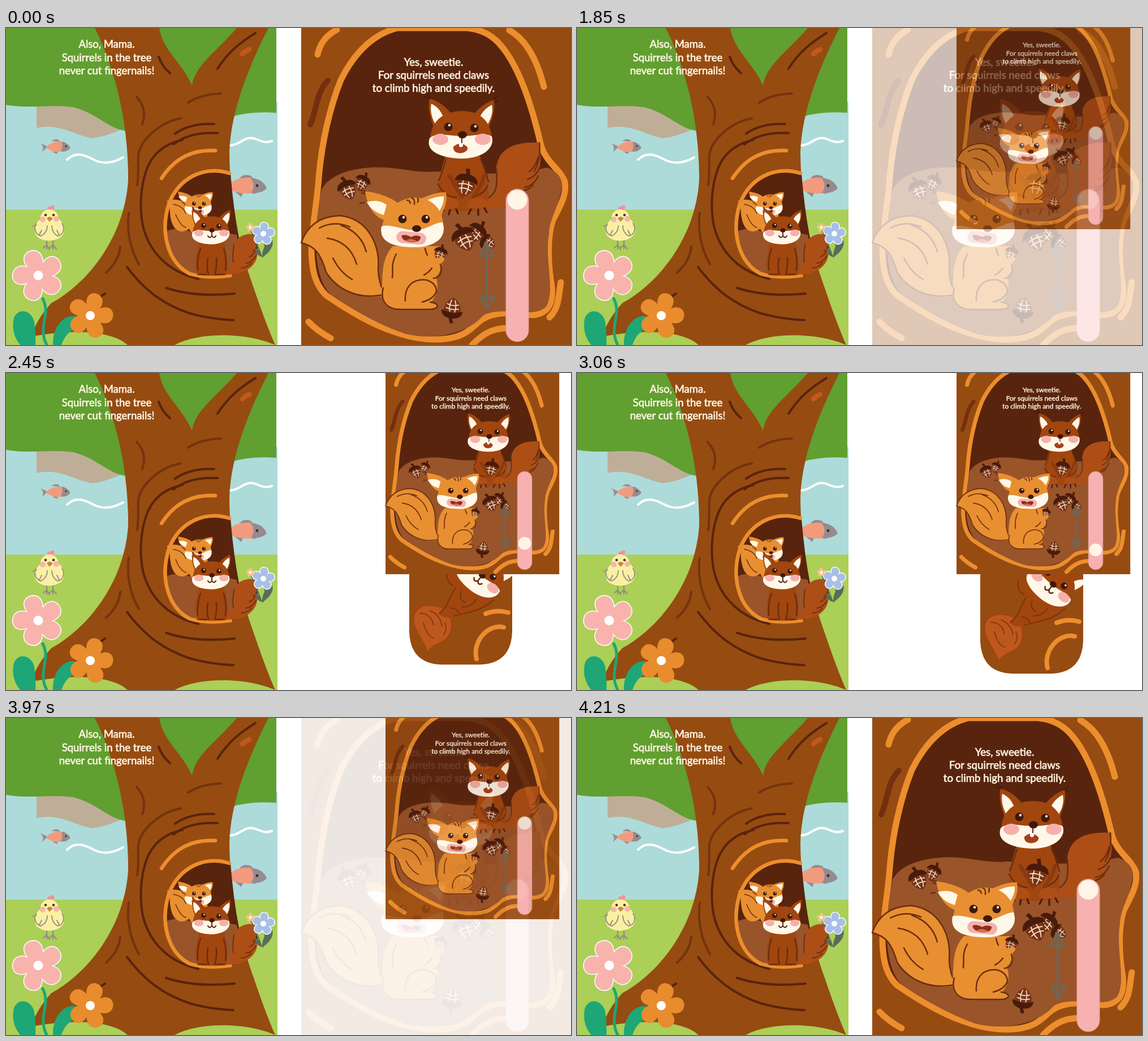
Recreate the animation shown at these times as an HTML page. Size 999 px wide and 561 px high, loop 4810 ms.

```html
<!DOCTYPE html>
<html lang="en">
<head>
<meta charset="utf-8">
<title>Squirrels in the tree</title>
<style>
html, body { margin: 0; width: 100%; height: 100%; overflow: hidden; background: #fff; }
svg { display: block; width: 100%; height: 100%; }
text { font-family: Lato, "Open Sans", sans-serif; fill: #fff6e4; stroke: #fff6e4; stroke-width: .65px; text-anchor: middle; }
.l { fill: none; stroke-linecap: round; stroke-linejoin: round; }
.dk { stroke: #59240d; stroke-width: 4; }
.md { stroke: #733310; stroke-width: 4; }
.or { stroke: #ec8e2d; stroke-width: 11; }
.thin { stroke: #6b2e0c; stroke-width: 2.5; }
.pup { fill: #e88f32; }
.mama { fill: #a1460f; }
.tail { fill: #ad4e17; }
.cream { fill: #fff8e9; }
</style>
</head>
<body>
<svg viewBox="0 0 999 561" preserveAspectRatio="none">
<defs>
  <g id="eyes">
    <circle r="7.5" fill="#3f1809"/><circle cx="2" cy="-3" r="2.2" fill="#fff"/>
  </g>
  <g id="acorn">
    <path d="M-15-5C-16 9-8 17 0 21C8 17 16 9 15-5Z" fill="#73331a"/>
    <path d="M-19-2C-18-13-9-16-2-16L-5-24L1-25L4-16C11-15 18-12 19-2Q0-9-19-2Z" fill="#491b0b"/>
    <path class="l" stroke="#f3dcbc" stroke-width="1.8" d="M-11 2Q0-2 11 2M-10 9Q0 5 10 9M-5-4Q-7 8-3 16M4-4Q7 6 3 16"/>
  </g>
  <!-- heads have the nose at 0,0 -->
  <g id="mamaHead">
    <path class="mama" d="M-50-12C-60-36-61-54-58-64C-42-60-27-48-21-38ZM47-14C56-36 58-52 55-62C40-56 30-48 22-38Z"/>
    <path class="cream" d="M-47-17C-56-32-57-46-55-55C-44-50-36-40-33-28ZM45-19C53-32 54-44 52-53C42-48 34-40 30-29Z"/>
    <path class="mama" d="M-57 15C-59-20-38-42 0-42C36-42 52-20 53 15C40 36-45 36-57 15Z"/>
    <path class="cream" d="M-58 6C-46-6-20 3 0 2C20 3 42-5 52 3C57 20 42 40 2 42C-40 42-66 28-58 6Z"/>
    <ellipse cx="-39" cy="8" rx="14" ry="10" fill="#f6b0ac"/><ellipse cx="36" cy="8" rx="14" ry="10" fill="#f6b0ac"/>
    <use href="#eyes" x="-25" y="-14"/><use href="#eyes" x="21" y="-12"/>
    <ellipse rx="8" ry="6.5" fill="#3f1809"/>
  </g>
  <path id="smile" class="l" stroke="#59240d" stroke-width="3" d="M0 5V14M-11 15Q-6 24 0 15Q6 24 11 15"/>
  <g id="pupHead">
    <path class="pup" d="M-54-14C-76-20-87-40-91-66C-68-64-44-54-34-46ZM6-52C22-60 38-65 52-64C55-50 50-36 43-22Z"/>
    <path class="cream" d="M-58-24C-74-28-84-38-88-47C-74-51-62-49-53-42ZM14-47C24-54 38-57 48-57C49-48 45-38 40-31C32-39 24-45 14-47Z"/>
    <path class="pup" d="M-62 4C-60-32-32-54-4-55C28-55 46-34 47-6L40 20H-50Z"/>
    <path class="cream" d="M-62-4C-46-9-22 4 0 3C18 2 34-12 46-11C54 12 38 30 4 33C-36 34-68 26-62-4Z"/>
    <g transform="rotate(5 -9 17)">
      <rect x="-36" y="6" width="53" height="21" rx="10.5" fill="#f5b0ae"/>
      <path d="M-27 14Q-20 10-10 15Q-2 9 7 13Q7 24-9 24Q-25 24-27 14Z" fill="#8b3014"/>
      <path d="M-20 22Q-9 15 2 22Q-8 25-20 22Z" fill="#df6d50"/>
    </g>
    <use href="#eyes" x="-25" y="-17"/><use href="#eyes" x="16" y="-17"/>
    <ellipse rx="8" ry="6" fill="#3f1809"/>
    <path class="l thin" d="M-17-50Q-13-51-11-45M-8-54Q-3-53-4-43M2-54Q4-50 2-47"/>
  </g>

  <g id="scene">
    <rect x="522" y="-14" width="477" height="581.5" fill="#964b11"/>
    <path fill="#59240d" stroke="#ec8e2d" stroke-width="11" d="M692 0C645 12 614 48 592 92C572 142 558 205 553 265C550 310 541 350 540 395C541 430 547 455 566 473C598 495 640 522 682 536C720 550 765 557 800 545C828 535 832 515 860 508C890 500 905 508 932 508C958 505 968 488 965 458C957 410 958 365 967 340C980 315 992 295 988 272C980 250 955 238 946 208C935 160 912 75 876 32C860 12 838 2 815 0Z"/>
    <path d="M558 286C570 262 606 249 644 247C690 244 722 258 760 254C825 258 890 262 957 247C970 252 984 262 983 280C978 318 961 335 960 365C952 410 972 465 955 493C935 515 880 491 844 508C820 539 760 555 705 541C650 522 610 495 572 470C545 440 541 370 558 286Z" fill="#99542a"/>
    <path class="l or" d="M585 3C566 13 555 27 551 47M890 4C922 22 940 60 951 104M535 520Q550 536 574 549M981 450C976 480 978 495 961 512M824 561C848 536 865 532 886 531"/>
    <path class="l" stroke="#732f10" stroke-width="10" d="M569 93C548 115 551 140 538 171"/>
    <text font-size="18.7"><tspan x="756" y="67">Yes, sweetie.</tspan><tspan x="756" y="90">For squirrels need claws</tspan><tspan x="756" y="113">to climb high and speedily.</tspan></text>

    <use href="#acorn" transform="translate(604 285) rotate(-22) scale(.95)"/>
    <use href="#acorn" transform="translate(630 273) rotate(28) scale(.75)"/>

    <!-- mother -->
    <path class="tail" d="M842 305C875 305 866 272 867 248C870 216 895 200 943 203C946 222 947 240 940 258C930 300 896 318 848 320Z"/>
    <path class="l thin" d="M943 203C946 230 939 245 934 254M941 228Q937 246 925 254M944 246Q938 262 922 268M941 262Q934 278 917 282M932 278Q922 288 910 289M867 250C869 280 868 294 850 302"/>
    <path class="mama" d="M777 226C768 255 758 290 766 318Q806 329 850 319C858 292 848 255 838 226Z"/>
    <path class="l thin" d="M778 232C772 250 771 258 765 270M839 232C848 250 850 262 853 272M764 276C770 288 778 298 796 300M852 278C848 290 838 296 824 300"/>
    <path class="tail" d="M762 318Q762 300 782 300Q800 301 801 316Q784 324 762 318ZM816 317Q816 301 834 300Q852 301 854 316Q834 323 816 317Z"/>
    <path class="l" stroke="#491b0b" stroke-width="3.2" d="M774 322L769 328M785 322L783 330M796 321L799 328M822 321L818 329M835 321V331M846 319L850 326"/>
    <use href="#acorn" transform="translate(813 276) rotate(12) scale(1.1)"/>
    <path class="l" stroke="#8a3a10" stroke-width="7" d="M784 262Q794 280 806 299M845 262Q840 282 828 296"/>
    <path class="l" stroke="#491b0b" stroke-width="2.4" d="M749 126L740 121M751 124L744 117M860 128L868 122M862 131L870 129"/>
    <use href="#mamaHead" x="807" y="189"/>
    <path d="M791 210Q804 199 816 211C819 223 789 227 791 210Z" fill="#a5401a"/>
    <path d="M801 202H808V209Q804 213 801 209Z" fill="#fff"/>
    <path class="l" stroke="#59240d" stroke-width="2" d="M806 195V203"/>

    <!-- child -->
    <path class="pup" d="M668 474C624 484 580 457 564 426C555 398 545 386 522 380C534 350 562 331 592 332C638 338 662 380 659 424C659 445 664 455 668 468Z"/>
    <path class="l thin" d="M668 472C620 482 582 460 566 432C556 398 546 386 522 380Q538 334 590 332C640 337 662 384 658 428Q659 450 667 465M554 354Q580 340 608 352M592 349Q628 362 637 396M568 372Q608 378 620 418M578 407Q590 432 612 445"/>
    <path class="pup" d="M684 386C662 410 667 440 664 466C664 490 673 498 700 498H754C768 496 765 486 752 485C766 468 764 452 760 440C774 429 772 402 765 386Z"/>
    <path class="l thin" d="M690 400C680 418 685 428 683 442M667 460C660 488 678 499 700 498H750C768 497 766 487 750 485M706 483C704 455 722 443 744 446Q761 452 761 466Q756 480 736 485M741 390C743 403 749 410 763 412M753 425Q746 434 739 437M768 418Q774 440 756 443"/>
    <use href="#acorn" transform="translate(768 399) rotate(18) scale(.66)"/>
    <path class="l" stroke="#e88f32" stroke-width="10" d="M750 405Q760 418 770 409"/>
    <path class="l thin" d="M636 289L625 287M638 293L629 292M633 309L626 310"/>
    <use href="#pupHead" x="726" y="355"/>

    <use href="#acorn" transform="translate(851 379) rotate(-58) scale(.75)"/>
    <use href="#acorn" transform="translate(832 362) rotate(38) scale(.95)"/>
    <use href="#acorn" transform="translate(810 372) rotate(-24) scale(1.15)"/>
    <use href="#acorn" transform="translate(789 498) rotate(188)"/>
    <path class="l" stroke="#6c6858" stroke-width="4" d="M850 384V491M849 380L838 403H861ZM851 496L839 476L864 475Z"/>
    <rect x="884" y="285" width="40" height="270" rx="20" fill="#f6b1b0" stroke="#e4a09b" stroke-width="1"/>
    <circle id="knob" cx="904" cy="304" r="17.5" fill="#fff5e6"/>
  </g>
  <clipPath id="tabEdge"><path d="M713 290H895V456Q893 514 835 514H773Q715 514 713 456Z"/></clipPath>
  <clipPath id="page"><rect width="480" height="561"/></clipPath>
</defs>

<rect width="999" height="561" fill="#fff"/>

<g clip-path="url(#page)">
  <rect y="131" width="480" height="195" fill="#addbd9"/>
  <path d="M54 134H205V179Q175 193 152 195C118 189 95 168 54 177Z" fill="#bfae97"/>
  <path d="M0 0H478V150Q430 147 400 157L330 160L212 182C180 178 160 150 118 140C80 135 40 143 0 136Z" fill="#609f30"/>
  <rect y="321.5" width="480" height="240" fill="#abcf57"/>

  <!-- fish -->
  <path d="M61 204L74 210L63 220Q69 212 61 204ZM80 200Q90 193 96 201ZM82 219L90 223L92 218Z" fill="#9a8c91"/>
  <path d="M70 211Q90 193 111 207Q109 221 88 219Q78 218 70 211Z" fill="#f29a7e"/>
  <path d="M98 201Q108 202 114 212Q106 221 97 218Q102 209 98 201Z" fill="#968a90"/><circle cx="106" cy="209" r="1.6" fill="#332"/>
  <path d="M412 268Q418 256 434 262L438 270ZM404 289L416 299L420 290ZM432 290L440 294L443 290Z" fill="#968a90"/>
  <path d="M390 284Q400 262 436 265L446 291Q415 297 390 284Z" fill="#f29a7e"/>
  <path d="M432 265Q455 267 461 284Q450 294 433 292Q443 278 432 265Z" fill="#968a90"/><circle cx="444" cy="279" r="2.4" fill="#332"/>
  <path class="l" stroke="#fff" stroke-width="4" d="M108 233C126 216 143 227 159 235C177 242 193 237 207 229M390 208C415 209 418 192 437 195C449 198 455 205 470 200"/>

  <!-- tree -->
  <path d="M157 0H271C277 40 312 62 329 102C334 66 372 42 408 0H464C431 65 397 145 395 222C396 320 415 395 438 460Q460 525 476 561C430 540 345 536 298 561H215C188 536 120 532 45 546Q54 515 80 487C140 455 209 375 216 270C217 175 196 78 157 0Z" fill="#964b11"/>
  <path class="l md" d="M231 122C245 137 247 153 241 170M322 132Q345 117 380 116M309 160C270 167 237 200 234 225C233 245 235 260 232 278M217 327C213 357 219 390 235 418M202 387Q200 412 177 433"/>
  <path class="l dk" d="M441 9C415 25 393 42 374 72M270 51Q276 68 290 80M299 187Q326 168 368 170M296 206Q325 183 374 186M312 198C280 205 260 223 250 247C237 280 236 320 242 350C254 400 290 432 340 444M283 460Q335 477 404 470M214 423C245 465 280 490 325 505Q360 515 402 517M175 470L163 478"/>
  <path class="l" stroke="#c1581c" stroke-width="9" d="M418 46Q424 40 430 38"/>
  <path d="M397 258C350 244 303 266 286 320C276 370 288 422 330 438Q370 445 402 438L412 372Q402 320 397 258Z" fill="#59240d"/>
  <path d="M283 360Q305 350 330 362Q370 357 408 366L418 432Q365 447 325 434Q287 412 283 360Z" fill="#99542a"/>
  <path class="l or" style="stroke-width:6.5" d="M275 266C299 229 330 215 370 217M395 257C350 243 306 265 288 311C272 362 286 415 325 435Q355 444 397 438"/>

  <!-- pup in the den -->
  <path class="pup" d="M328 352C311 367 297 360 292 340C288 325 292 314 284 306C304 299 324 308 331 330Z"/>
  <path class="l thin" style="stroke-width:1.5" d="M296 312Q313 315 318 328M300 330Q308 350 318 353M311 308Q322 314 324 328"/>
  <path class="pup" d="M325 322Q316 358 334 366H357L356 322Z"/>
  <use href="#pupHead" transform="translate(343 318) scale(.43)"/>
  <path class="l thin" d="M330 318Q336 328 345 323"/>
  <!-- mother in the den -->
  <path class="tail" d="M388 434C405 424 399 399 404 381C412 366 428 362 443 366C447 380 446 399 442 411C433 430 411 438 388 436Z"/>
  <path class="l thin" style="stroke-width:1.8" d="M443 367Q447 389 437 395M444 388Q439 402 430 405M442 403Q434 416 424 416M434 416Q427 424 416 425M403 383Q400 405 402 415"/>
  <path class="mama" d="M343 375C336 395 333 420 338 437Q365 440 390 437C394 416 390 392 384 375Z"/>
  <path class="l thin" d="M344 390Q337 410 339 428M385 390Q391 410 388 429M357 407Q354 424 358 436M372 407Q373 425 369 436M341 436H354M372 436H386"/>
  <use href="#mamaHead" transform="translate(364 358) scale(.59)"/>
  <use href="#smile" transform="translate(364 358) scale(.65)"/>

  <!-- blue flower -->
  <path class="l" stroke="#58725a" stroke-width="2" d="M456 378Q461 390 454 405M434 360Q443 380 452 404"/>
  <path d="M453 406Q452 384 471 375Q475 391 453 406ZM452 405Q440 401 440 390Q451 392 452 405Z" fill="#586d58"/>
  <g id="blue" fill="#a8bfe8" stroke="#fff"></g><circle cx="455" cy="364" r="5" fill="#fff"/>
  <g id="small" fill="#f4c58a"></g><circle cx="432" cy="353" r="2.4" fill="#fff"/>

  <!-- chick -->
  <path class="l" stroke="#968c80" stroke-width="2.2" d="M72 375V391M83 375V391M66 389L72 384L77 392M77 389L83 384L89 391"/>
  <path d="M73 322C72 315 78 315 79 317C80 311 87 313 85 319Q84 323 78 324Z" fill="#f29190"/>
  <path d="M61 338C60 317 91 314 93 337C101 344 105 354 102 363C95 380 60 381 52 365C49 354 53 344 61 338Z" fill="#faf0a4"/>
  <circle cx="65" cy="339" r="5" fill="#f8b3ad"/><circle cx="89" cy="338" r="5" fill="#f8b3ad"/>
  <circle cx="70" cy="331" r="2.3" fill="#59301c"/><circle cx="84" cy="331" r="2.3" fill="#59301c"/>
  <path d="M72 337Q77 331 83 337L77 343Z" fill="#c18a4a"/>
  <path class="l" stroke="#968c80" stroke-width="1.8" d="M53 346C49 355 52 366 62 368Q73 362 73 350M99 346C105 355 101 367 91 368Q81 362 81 350M59 366L63 358M94 366L90 358M47 351L54 349"/>

  <!-- front flowers -->
  <path class="l" stroke="#1ea676" stroke-width="5" d="M65 479C80 508 55 528 72 561"/>
  <path d="M14 513C22 494 45 499 50 520Q53 540 52 561H25Q8 540 14 513ZM83 561C82 530 101 508 121 510Q135 514 121 533Q105 540 98 561Z" fill="#1ea676"/>
  <g id="pink" fill="#f8b3ad" stroke="#fff"></g><circle cx="57" cy="438" r="8.5" fill="#fff"/>
  <g id="orange" fill="#e98c2e"></g><circle cx="149" cy="509" r="8" fill="#fff"/>
  <text font-size="18.5"><tspan x="178" y="35">Also, Mama.</tspan><tspan x="178" y="58.5">Squirrels in the tree</tspan><tspan x="178" y="82">never cut fingernails!</tspan></text>
</g>

<g id="tab"><g clip-path="url(#tabEdge)">
  <rect x="713" y="290" width="182" height="224" fill="#964b11"/>
  <path class="l or" style="stroke-width:8" d="M848 424Q868 416 888 422M832 504C824 475 851 441 880 448"/>
  <path d="M746 493C738 468 718 452 721 428C727 406 753 405 776 416C794 435 790 462 774 472C760 480 751 481 746 493Z" fill="#bd581d" stroke="#a3430f" stroke-width="2"/>
  <path class="l" stroke="#8a3910" stroke-width="2" d="M732 423Q752 424 756 444M750 419Q768 426 771 446M738 440Q744 463 756 467M776 440Q781 451 774 461"/>
  <path class="mama" d="M764 423C782 408 783 394 794 380L776 360Q780 340 792 350L810 368L862 400C842 420 815 421 792 428Q777 436 764 423Z"/>
  <path class="l" stroke="#7a3310" stroke-width="2" d="M767 423C784 410 783 392 795 379M780 351Q777 366 790 374M862 399C842 420 815 421 792 428M805 384Q800 399 811 404M832 398Q823 413 806 412M786 414Q797 414 801 423"/>
  <use href="#mamaHead" transform="translate(842 356) rotate(38) scale(.8)"/>
  <use href="#smile" transform="translate(842 356) rotate(38) scale(.8)"/>
</g></g>
<use href="#scene" transform="translate(334.9 -9.4) scale(.644)"/>
<use id="big" href="#scene"/>
</svg>
<script>
const el = id => document.getElementById(id);
const LOOP = 4810, STEP = 30, TRAVEL = 149, SMALL = 0.644;

// five rounded petals around a centre; the rim lies under all fills
function petals(id, x, y, size, turn) {
  const d = "M0 0C-.38 -.3 -.62 -1 -.08 -1.09C.55 -1.12 .45 -.3 0 0Z";
  for (const width of [3, 0])
    for (let i = 0; i < 5; i++) {
      const p = document.createElementNS("http://www.w3.org/2000/svg", "path");
      p.setAttribute("d", d);
      p.setAttribute("stroke-width", width / size);
      p.setAttribute("transform", `translate(${x} ${y}) rotate(${turn + i * 72}) scale(${size})`);
      el(id).append(p);
    }
}
petals("pink", 57, 438, 41, -16);
petals("orange", 149, 509, 37, 18);
petals("blue", 455, 364, 18, 8);
petals("small", 432, 353, 7, 0);

// linear 0..1 between two times, in whole steps
function ramp(t, from, to) {
  const now = from + Math.floor((t - from) / STEP + 1e-6) * STEP;
  return Math.min(1, Math.max(0, (now - from) / (to - from)));
}

function draw(t) {
  const off = TRAVEL * (ramp(t, 1940, 2600) - ramp(t, 2970, 3570));
  el("big").setAttribute("opacity", 1 - ramp(t, 1640, 1940) + ramp(t, 3940, 4210));
  el("knob").setAttribute("cy", 304 + off / SMALL);
  el("tab").setAttribute("transform", `translate(0 ${356 + 1.39 * off - 514})`);
}

const start = performance.now();
function tick() {
  draw((performance.now() - start) % LOOP);
  requestAnimationFrame(tick);
}
draw(0);
requestAnimationFrame(tick);
</script>
</body>
</html>
```
